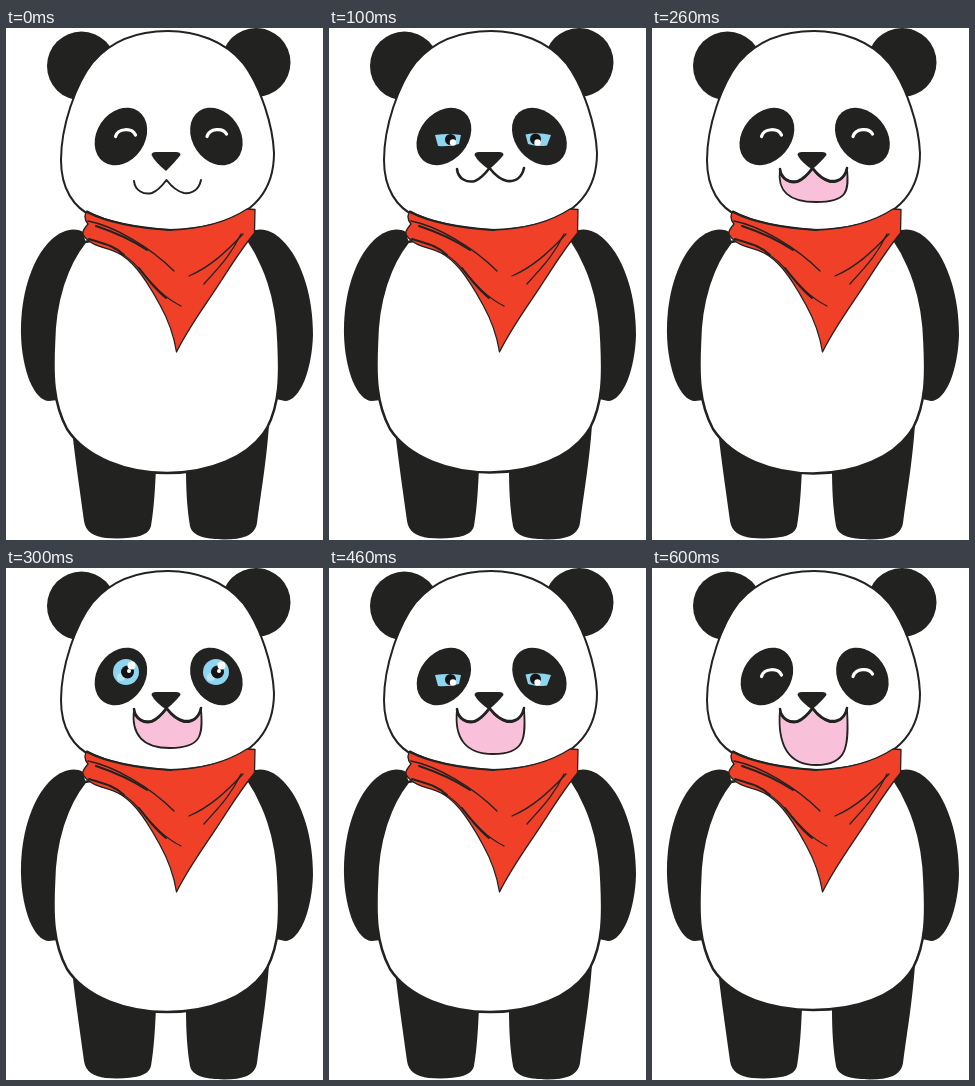
An HTML page for the animation above (0.7 s loop, 317 by 512 pixels).

```html
<!DOCTYPE html>
<html lang="en">
<head>
<meta charset="utf-8">
<title>Smiling panda</title>
<style>
  html, body { margin: 0; width: 100%; height: 100%; overflow: hidden; background: #fff; }
  svg { display: block; width: 100vw; height: 100vh; }
  .ink { fill: #222221; }
  .skin { fill: #fff; stroke: #222221; stroke-width: 2.5; }
  .line { fill: none; stroke: #222221; stroke-linecap: round; stroke-linejoin: round; }
  .smile { fill: none; stroke: #fff; stroke-width: 3.2; stroke-linecap: round; }
  .iris { fill: #8ed5ef; }
  .dark { fill: #141414; }
  .light { fill: #fff; }
</style>
</head>
<body>
<svg viewBox="0 0 317 512" preserveAspectRatio="none">
  <!-- limbs -->
  <g class="ink">
    <path d="M77 204C68 199 56 202 45 212C26 230 14 267 15 307C16 342 28 373 43 373L52 372L80 216Z"/>
    <path d="M245 204C254 199 266 202 276 212C295 230 307 267 307 307C306 342 294 373 279 373L270 371L240 216Z"/>
    <path d="M66 402C70 438 75 470 78 493C80 506 91 510.500 111 510.500C132 510 143 507 145 498C148 480 149 462 150 440Z"/>
    <path d="M263 397C260 438 254 470 251 495C249 507 238 511.500 218 511.500C196 511 186 507 184 498C181 480 180 462 180 440Z"/>
  </g>
  <path id="belly" class="skin"/>

  <!-- head -->
  <circle class="ink" cx="75.500" cy="38" r="34.500"/>
  <circle class="ink" cx="250" cy="34.500" r="34.500"/>
  <path class="skin" style="stroke-width:2" d="M162 3C133 3 106 12 87 34C69 57 55 99 55 132C55 160 67 180 88 189C111 198 138 202 163 202C190 201 218 197 238 184C258 171 268 150 268 125C267 98 255 59 237 35C219 13 190 3 162 3Z"/>

  <!-- scarf -->
  <path fill="#f04027" stroke="#222221" stroke-width="1.300" stroke-linejoin="round" d="M81 183C101 194 132 200 165 202C194 201 221 194 241 181L249 181.500L248.500 205C236 220 226 236 215 253C201 275 184 297 170.500 324C168 308 164 295 154 277C147 264 140 252 131 241C123 232 118 228 112 225C102 220 90 219 83 213C74 206 76 203 82 196C78 191 78 187 81 183Z"/>
  <g class="line">
    <path stroke-width="2" d="M81 184C101 194 132 200 165 202"/>
    <path stroke-width="1.300" d="M82 193C108 198 144 219 168 243"/>
    <path stroke-width="2" d="M90 198C108 204 126 212 141 222"/>
    <path stroke-width="2" d="M83 211C95 215 108 217 118 227"/>
    <path stroke-width="1.300" d="M113 225C134 233 143 262 175 278"/>
    <path stroke-width="2" d="M133 240C142 252 150 262 160 270"/>
    <path stroke-width="1.300" d="M237 206C220 224 204 239 183 248"/>
    <path stroke-width="1.300" d="M235 206C224 229 211 241 198 256"/>
  </g>

  <!-- face -->
  <ellipse id="patchL" class="ink"/>
  <ellipse id="patchR" class="ink"/>
  <g id="shut" class="smile">
    <path d="M109.500 108.500C112 100 126 99.500 129.500 107"/>
    <path d="M201 108.500C203.500 100 217 99.500 220.500 106"/>
  </g>
  <g id="half">
    <path class="iris" d="M106 107Q119 105 132 107L130 116Q119 119 109 118Z"/>
    <path class="iris" d="M196.500 106.500Q209 104 222 107L218 117.500Q208 119 199 116Z"/>
    <circle class="dark" cx="121.500" cy="111.500" r="5.500"/>
    <circle class="dark" cx="206.500" cy="111" r="5.500"/>
    <circle class="light" cx="124" cy="114.500" r="3.200"/>
    <circle class="light" cx="208.500" cy="114.500" r="3.200"/>
  </g>
  <g id="wide"></g>
  <path id="nose" class="ink"/>
  <path id="mouth" fill="#f9c0da" stroke="#222221" stroke-width="1.800" stroke-linejoin="round"/>
  <path id="lip" class="line"/>
</svg>
<script>
const $ = id => document.getElementById(id);
const STEP = 100;

// eyes, patch swell, belly bottom, mouth bottom (0 = closed)
const poses = [
  { eyes: "shut", patch: 0,   belly: 446,   jaw: 0 },
  { eyes: "half", patch: 1,   belly: 445.5, jaw: 0 },
  { eyes: "shut", patch: 1,   belly: 446.5, jaw: 174 },
  { eyes: "wide", patch: 0,   belly: 445,   jaw: 180 },
  { eyes: "half", patch: 0.8, belly: 445,   jaw: 186 },
  { eyes: "shut", patch: 0.8, belly: 443,   jaw: 191 },
  { eyes: "shut", patch: 0,   belly: 443,   jaw: 197 }
];

const openEye = x => `
  <circle class="iris" cx="${x}" cy="104" r="13"/>
  <circle cx="${x - 5}" cy="109" r="4" fill="#b9e6f5"/>
  <circle class="dark" cx="${x + 1.5}" cy="104" r="6.5"/>
  <circle class="light" cx="${x + 5.5}" cy="97.5" r="4"/>
  <circle class="light" cx="${x + 3}" cy="103" r="2"/>`;
$("wide").innerHTML = openEye(120) + openEye(210);

function setPatch(id, x, side, swell) {
  const el = $(id);
  el.setAttribute("rx", 24);
  el.setAttribute("ry", 30.7 + swell);
  el.setAttribute("transform", `translate(${x} 108.5) rotate(${side * (34 + 6 * swell)})`);
}

const bellyPath = b => `M79 214C60 238 48.500 274 48 315C46.500 347 47 375 61 401
  C80 430 121 ${b - 1} 161 ${b - 1}C202 ${b - 1} 243 430 261 400
  C274 375 274 347 272.500 315C271.500 274 260 238 241 210L165 198Z`;

const lipCurve = y => `M128 ${y}C129 ${y + 10} 138 ${y + 14} 146 ${y + 12}
  Q153 ${y + 9} 160.500 ${y - 1}Q169 ${y + 10} 178 ${y + 12}C187 ${y + 13} 193 ${y + 8} 195 ${y - 1}`;

function mouthPath(jaw) {
  const mid = 142 + (jaw - 142) * 0.65;
  return `${lipCurve(142)}C197 ${mid} 196 ${jaw} 164 ${jaw}
    C137 ${jaw} 125 ${mid} 128 142Z`;
}

function draw(index) {
  const { eyes, patch, belly, jaw } = poses[index];
  for (const id of ["shut", "half", "wide"]) $(id).style.display = id === eyes ? "" : "none";
  setPatch("patchL", 114.9, 1, patch);
  setPatch("patchR", 210.4, -1, patch);
  $("belly").setAttribute("d", bellyPath(belly));
  const resting = index === 0;
  $("nose").setAttribute("d", `M145.500 127Q145.500 124 150 124H170Q174.500 124 174.500 127
    Q169 134 160 ${resting ? 143 : 141.5}Q149 134 145.500 127Z`);
  $("mouth").style.display = jaw ? "" : "none";
  if (jaw) $("mouth").setAttribute("d", mouthPath(jaw));
  $("lip").setAttribute("d", lipCurve(resting ? 153 : 141));
  $("lip").setAttribute("stroke-width", resting ? 2 : 2.6);
}

let shown = -1;
function tick() {
  const index = Math.floor(performance.now() / STEP) % poses.length;
  if (index !== shown) draw(shown = index);
  requestAnimationFrame(tick);
}
tick();
</script>
</body>
</html>
```
